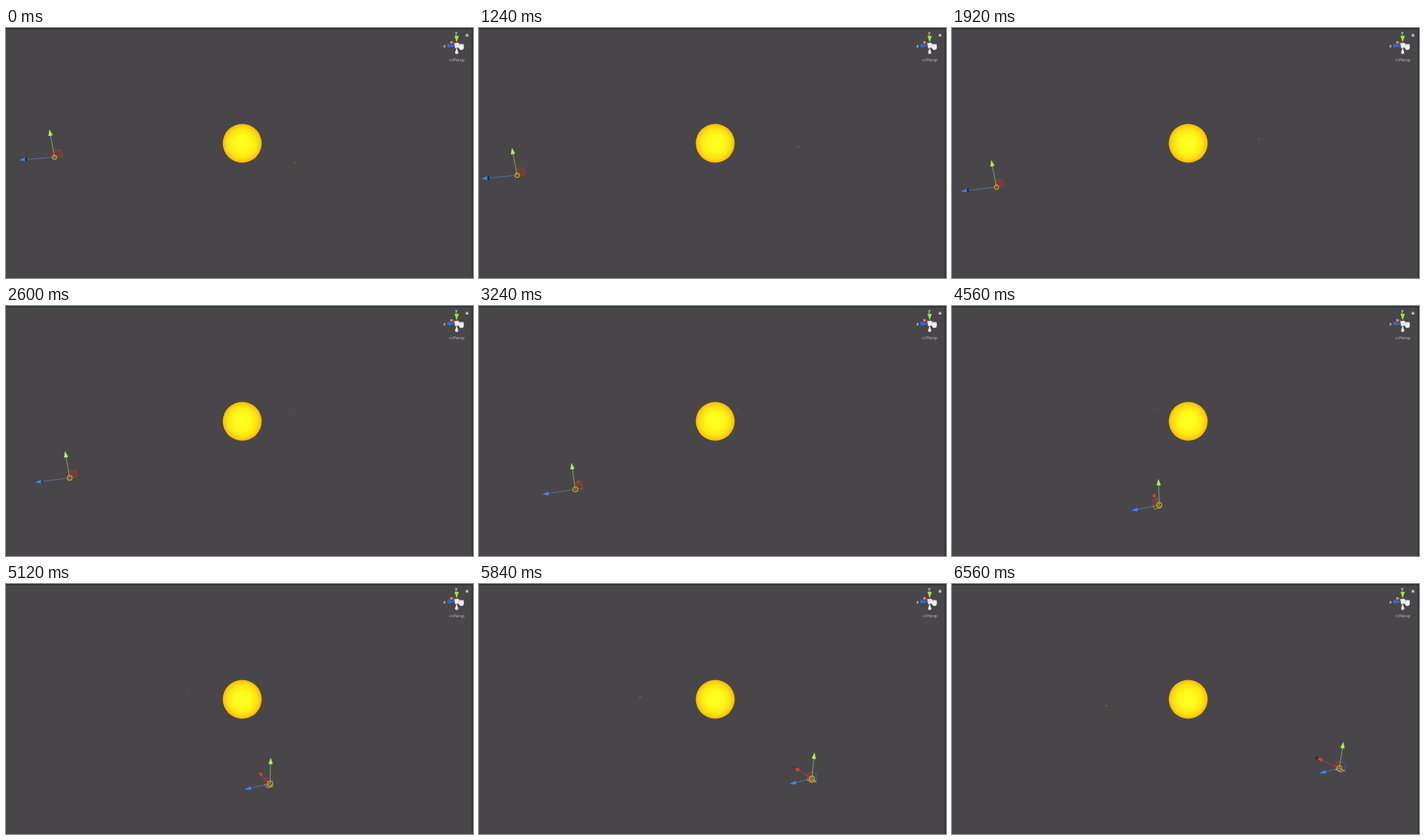
An HTML page that plays this animation: 600 px wide and 322 px high, repeating every 6640 ms.

```html
<!DOCTYPE html>
<html lang="en">
<head>
<meta charset="utf-8">
<title>Orbit in the scene view</title>
<style>
  html, body { margin: 0; width: 100%; height: 100%; overflow: hidden; background: #484648; }
  svg { display: block; width: 600px; height: 322px; }
  text { font-family: "Liberation Sans", Arial, sans-serif; }
</style>
</head>
<body>
<svg viewBox="0 0 600 322">
  <defs>
    <radialGradient id="glow">
      <stop offset="0" stop-color="#ffff28"/>
      <stop offset=".4" stop-color="#fffb1a"/>
      <stop offset=".75" stop-color="#ffe610"/>
      <stop offset="1" stop-color="#ffb60c"/>
    </radialGradient>
  </defs>
  <rect width="600" height="322" fill="#484648"/>
  <rect width="600" height="1.5" fill="#26312f"/>
  <rect x="598.5" width="1.5" height="322" fill="#2b3032"/>

  <circle id="moon" r="1.3"/>
  <circle cx="303.5" cy="148.5" r="25" fill="url(#glow)"/>

  <g id="handles" stroke-linejoin="round">
    <path id="planeRed" fill="#b03028" fill-opacity=".42" stroke="#a04438" stroke-width=".7"/>
    <path id="planeBlue" fill="#3858b0" fill-opacity=".15" stroke="#4668b8" stroke-width=".8"/>
    <path id="planeGreen" fill="#a0a030" fill-opacity=".15" stroke="#b8b044" stroke-width=".9"/>
    <path id="lineRed" stroke="#a85048" stroke-width=".8"/>
    <path id="lineGreen" stroke="#88aa60" stroke-width=".9"/>
    <path id="lineBlue" stroke="#5a74a8" stroke-width=".9"/>
    <circle id="ring" fill="none" stroke="#d89c18" stroke-width="1.2"/>
    <path id="coneRed" fill="#dc4030"/>
    <circle id="tipRed" r="1.7" fill="#2c2020"/>
    <path id="coneGreen" fill="#a9f052"/>
    <path id="coneBlue" fill="#4380ee"/>
    <ellipse id="baseBlue" rx="1.4" ry="2.6" fill="#182238"/>
  </g>

  <g id="compass">
    <path d="M571.5 17.8L574.5 17L577 20L574.5 21Z" fill="#c83c34"/>
    <path d="M581 20.5L588 20.8L588.4 25L584 28.4L581 25Z" fill="#dcdcdc"/>
    <ellipse cx="585.3" cy="25.2" rx="2.8" ry="3" fill="#f0f0f0"/>
    <path d="M576 22L567.5 20Q566 22.5 568 25.2L576 23.5Z" fill="#3468d0"/>
    <path d="M579 18.5L576.2 10.3Q579 9 581.8 10.3Z" fill="#94e83c"/>
    <path d="M579 25L576.8 32Q579 35 581.2 32Z" fill="#f0f0f0"/>
    <path d="M576 19.5L581.5 19L582 25L577 26Z" fill="#eeeeee"/>
    <g fill="#e4e4e4" font-size="5.6" font-weight="bold" text-anchor="middle">
      <text x="578.5" y="8">y</text>
      <text x="572" y="19.5">x</text>
      <text x="563.5" y="24.5">z</text>
    </g>
    <path d="M572.3 40L569.4 41.4L572.3 42.8M572.8 40V43" fill="none" stroke="#a8a8a8" stroke-width=".5"/>
    <text x="574.2" y="43.3" font-size="5.6" fill="#bcbcbc">Persp</text>
    <path d="M590.8 8.7h3v2h-3zM591.4 8.6V7.7h1.7v.9" fill="#c8c8c8" stroke="#c8c8c8" stroke-width=".4"/>
  </g>
</svg>
<script>
const LOOP = 6640, STEP = 40;
const SUN = [303.5, 148.5];

const el = id => document.getElementById(id);
const set = (id, attrs) => {
  for (const k in attrs) el(id).setAttribute(k, attrs[k]);
};
const ramp = (v, a, b) => Math.min(1, Math.max(0, (v - a) / (b - a)));
const scale = (v, f) => [v[0] * f, v[1] * f];
const add = (a, b) => [a[0] + b[0], a[1] + b[1]];

// Circular orbit seen in perspective; angle 0 is nearest to the camera.
// Returns the screen offset from the sun.
function orbit(radius, degrees) {
  const angle = degrees * Math.PI / 180;
  const side = radius * Math.sin(angle), near = radius * Math.cos(angle);
  const depth = 1 - .6 * near - .012 * side;
  return [(208 * side + 1.8 * near) / depth, 43.6 * near / depth];
}

const quad = (u, v) => `M0 0L${u}L${add(u, v)}L${v}Z`;

function cone(tip, length, width) {
  const [dx, dy] = scale(tip, 1 / Math.hypot(...tip));
  const x = tip[0] - dx * length, y = tip[1] - dy * length, h = width / 2;
  return `M${tip}L${x - dy * h} ${y + dx * h}`
    + `Q${x - dx} ${y - dy} ${x + dy * h} ${y - dx * h}Z`;
}

function drawHandles(t) {
  const place = orbit(1, .01442 * (t - 4881));
  const [dx, dy] = place;
  // An arm leans with its distance from the vanishing point
  const arm = (x, y, pull) => add([x, y], scale(place, pull));
  const red = arm(-11.5, -5.2, -.09);
  const green = arm(0, -36.5, .027);
  const blue = arm(-34.7, 2.6, .045);

  const side = dx < -140 ? -1 : 1;
  const redEdge = scale(red, -.25), greenEdge = scale(green, .25);
  const blueEdge = scale(blue, .22 * side);
  const redShow = ramp(dx, -250, -100);

  set("handles", { transform: `translate(${add(SUN, place)})` });
  set("planeRed", { d: quad(greenEdge, blueEdge) });
  set("planeBlue", { d: quad(greenEdge, redEdge), opacity: ramp(dx, -140, 100) });
  set("planeGreen", { d: quad(blueEdge, redEdge), opacity: ramp(dx, -220, 0) });
  set("lineRed", { d: `M0 0L${scale(red, .85)}`, opacity: redShow });
  set("lineGreen", { d: `M0 0L${scale(green, .8)}` });
  set("lineBlue", { d: `M0 0L${scale(blue, .82)}` });
  set("coneRed", { d: cone(red, Math.min(7, Math.hypot(...red) * .26), 5.2), opacity: redShow });
  set("tipRed", { cx: red[0], cy: red[1], opacity: ramp(dx, 60, 190) });
  set("coneGreen", { d: cone(green, 8, 5.6) });
  set("coneBlue", { d: cone(blue, 8.5, 5) });
  const [cx, cy] = scale(blue, 1 - 9 / Math.hypot(...blue));
  set("baseBlue", { cx, cy, opacity: .9 * (1 - ramp(dx, -245, -180)) });
  set("ring", { r: 2.6 + .7 * ramp(dy, 18, 100) });
}

function drawMoon(t) {
  const degrees = 29.5 + .0398 * t;
  const [cx, cy] = add(SUN, orbit(.49, degrees));
  const near = Math.cos(degrees * Math.PI / 180);
  const warm = ramp(near, .15, .35);
  const mix = (a, b) => Math.round(a + (b - a) * warm);
  set("moon", {
    cx, cy,
    fill: `rgb(${mix(122, 176)},${mix(114, 84)},${mix(112, 36)})`,
    opacity: .5 + .25 * warm - .25 * ramp(-near, .3, .6)
  });
}

const start = performance.now();
function tick() {
  const elapsed = (performance.now() - start) % LOOP;
  const t = Math.min(LOOP - 2 * STEP, Math.floor(elapsed / STEP) * STEP);
  drawHandles(t);
  drawMoon(t);
  requestAnimationFrame(tick);
}
tick();
</script>
</body>
</html>
```
